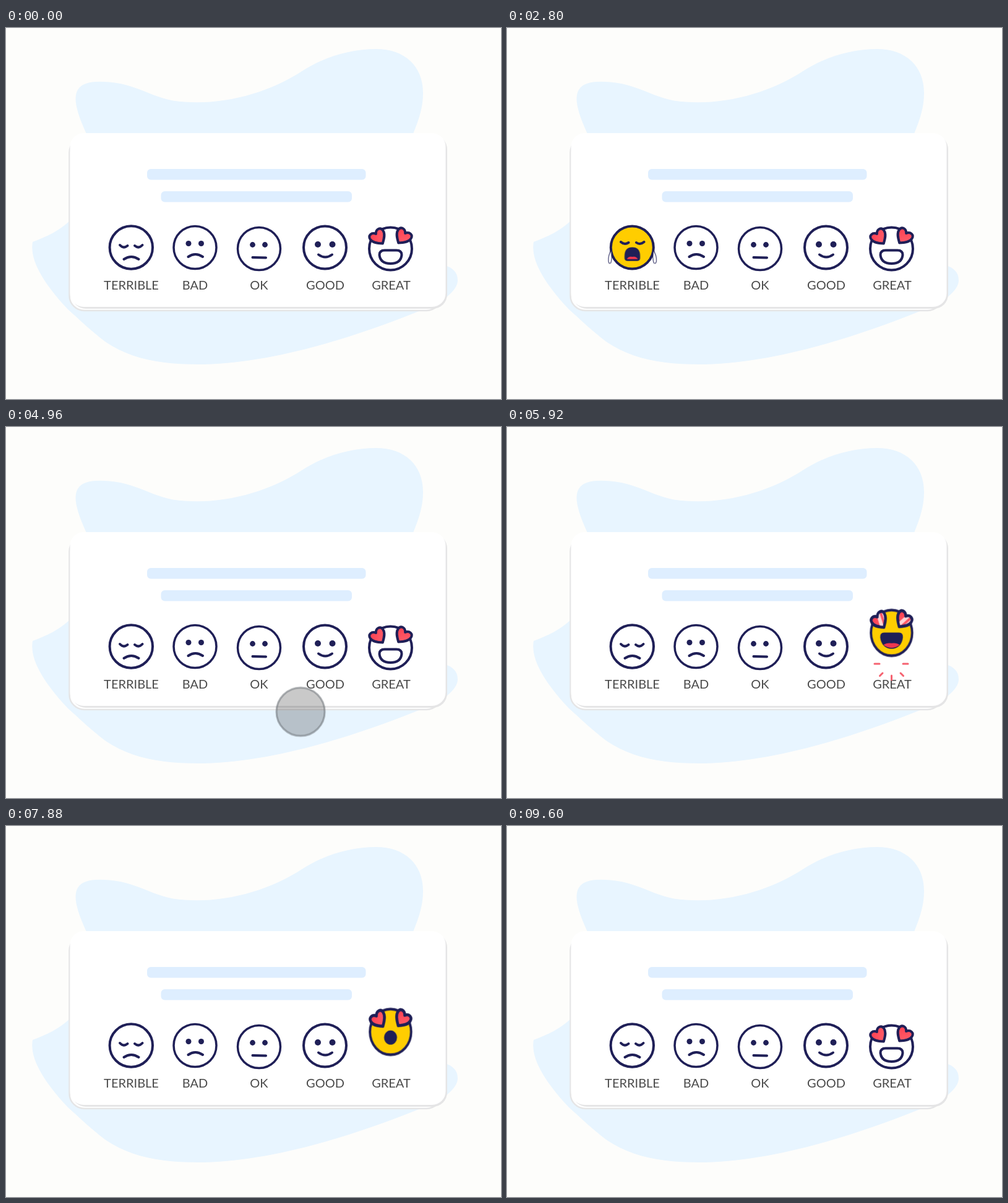
An HTML page that plays this animation: 800x600 px, repeating every 9620 ms.

```html
<!DOCTYPE html>
<html lang="en">
<head>
<meta charset="utf-8">
<title>Feedback card</title>
<style>
html, body { margin: 0; width: 100%; height: 100%; overflow: hidden; background: #fdfdfb; }
svg { display: block; width: 800px; height: 600px; }
text { font: 20px Lato, "Open Sans", sans-serif; fill: #4a4a4a; text-anchor: middle; }

:root { --loop: 9620ms; --half: 4810ms; }
.blob { fill: #e8f5ff; }
.bar { fill: #deeeff; }
.line { fill: none; stroke: #1f1f57; stroke-width: 4; stroke-linecap: round; stroke-linejoin: round; }
.thin { stroke-width: 3.5; }
.ink { fill: #1f1f57; }
.sun { fill: #ffcd00; }
.rose { fill: url(#rose); }
.tongue { fill: #f0374f; }
.drop { fill: #fff; stroke: #1f1f57; stroke-width: 1.4; }

/* Card stack */
.front { animation: swipe var(--half) infinite; }
.next { animation: promote var(--half) infinite; }
@keyframes swipe {
  0%, 80.665% { transform: none; animation-timing-function: cubic-bezier(.45, 0, .55, 1); }
  89.106%, 100% { transform: translateX(-720px); }
}
@keyframes promote {
  0% { opacity: 0; transform: translate(-8px, 3px); animation-timing-function: step-end; }
  81.2% { opacity: 1; transform: translate(-8px, 3px); }
  83.4%, 100% { opacity: 1; transform: none; }
}

.active { animation: show var(--loop) step-end infinite; }
.idle { animation: hide var(--loop) step-end infinite; }
@keyframes show { 0% { opacity: 0; } 4.68% { opacity: 1; } 50%, 100% { opacity: 0; } }
@keyframes hide { 0% { opacity: 1; } 4.68% { opacity: 0; } 50%, 100% { opacity: 1; } }

.sob { transform-origin: 202px 355px; animation: sob var(--loop) ease-in-out infinite; }
@keyframes sob {
  0%, 4.68% { transform: none; }
  5.82% { transform: scale(1.06, .93); }
  7.07% { transform: scale(.95, 1.06); }
  8.32% { transform: scale(1.02, .98); }
  9.4% { transform: none; }
  16.4% { transform: translateY(-1px) scale(.97, 1.04); }
  22.9% { transform: none; }
  24% { transform: scale(1.03, .97); }
  25.5%, 100% { transform: none; }
}
.weep { animation: early var(--loop) infinite; }
.wail { animation: late var(--loop) infinite; }
@keyframes early { 0%, 22.9% { opacity: 1; } 23.6%, 100% { opacity: 0; } }
@keyframes late { 0%, 22.9% { opacity: 0; } 23.6%, 100% { opacity: 1; } }
.tear { animation: tear 962ms linear infinite; transform-box: fill-box; transform-origin: 50% 0; }
@keyframes tear {
  0%, 35% { transform: scale(0); opacity: 1; }
  62% { transform: scale(1); opacity: 1; }
  95% { transform: translateY(22px); opacity: 1; }
  100% { transform: translateY(25px); opacity: 0; }
}
.stream { animation: stream 481ms linear infinite; }
@keyframes stream {
  0% { transform: translateY(-2px); opacity: .7; }
  11% { transform: none; opacity: 1; }
  80% { transform: translateY(10px); opacity: .8; }
  100% { transform: translateY(14px); opacity: 0; }
}
.howl { transform-box: fill-box; transform-origin: 50% 0; animation: howl 481ms ease-in-out infinite; }
@keyframes howl { 0%, 25%, 100% { transform: none; } 60% { transform: scale(.93, .86); } }

.jump { transform-origin: 621.5px 357px; animation: jump var(--loop) ease-in-out infinite; }
@keyframes jump {
  0%, 4.68% { transform: none; }
  5.82% { transform: translateY(3px) scale(1.07, .9); }
  7.9% { transform: translateY(-27px) scale(.95, 1.09); }
  9.36%, 100% { transform: translateY(-24px) scale(.965, 1.07); }
}
.laugh, .gasp { transform-box: fill-box; transform-origin: center; }
.laugh { animation: laugh var(--loop) infinite; }
.gasp { animation: gasp var(--loop) infinite; }
@keyframes laugh {
  0%, 22% { transform: none; opacity: 1; }
  23.9% { transform: scale(.55, .9); opacity: 1; }
  24%, 100% { transform: scale(.5); opacity: 0; }
}
@keyframes gasp { 0%, 23.4% { transform: scale(0); } 24.4%, 100% { transform: none; } }
.shine { fill: #fff; opacity: .75; animation: shine var(--loop) linear infinite; }
@keyframes shine { 0%, 9.9% { transform: translateX(-32px); } 13.2%, 100% { transform: translateX(32px); } }
.burst { fill: none; stroke: #f5616f; stroke-width: 3; stroke-linecap: round; transform-origin: 621.5px 383px; animation: burst var(--loop) ease-out infinite; }
@keyframes burst {
  0%, 8.8% { transform: scale(.4); opacity: 0; }
  9.4% { transform: scale(.6); opacity: 1; }
  11.54% { transform: none; opacity: 1; }
  13%, 100% { transform: scale(1.08); opacity: 0; }
}

/* Pointer */
.pointer { animation: travel var(--loop) infinite; }
.press { animation: press var(--half) infinite; }
.press circle { fill: rgba(0, 0, 0, .21); stroke: rgba(105, 110, 115, .55); stroke-width: 3; }
@keyframes travel {
  0%, .312% { transform: translate(400px, 500px); animation-timing-function: cubic-bezier(.45, 0, .55, 1); }
  3.482%, 8% { transform: translate(161px, 376px); }
  8.01%, 40.333% { transform: translate(472px, 395px); animation-timing-function: cubic-bezier(.45, 0, .55, 1); }
  44.553%, 49.99% { transform: translate(100px, 395px); }
  50%, 50.312% { transform: translate(400px, 500px); animation-timing-function: cubic-bezier(.45, 0, .55, 1); }
  53.482%, 58% { transform: translate(639px, 376px); }
  58.01%, 90.333% { transform: translate(472px, 395px); animation-timing-function: cubic-bezier(.45, 0, .55, 1); }
  94.553%, 100% { transform: translate(100px, 395px); }
}
@keyframes press {
  0%, .4% { opacity: 0; transform: none; }
  .8%, 7% { opacity: 1; transform: none; }
  9% { opacity: 1; transform: scale(.84); }
  11% { opacity: 1; transform: none; }
  14%, 73% { opacity: 0; transform: none; }
  76%, 80% { opacity: 1; transform: none; }
  81.1% { opacity: 1; transform: scale(1.06, .97); }
  86% { opacity: 1; transform: scale(1.1, .94); }
  89%, 100% { opacity: 0; transform: none; }
}

/* The great face reacts in the second half of the loop */
.great .idle, .great .active, .great .active * { animation-delay: calc(-1 * var(--half)); }
</style>
</head>
<body>
<svg viewBox="0 0 800 600">
  <defs>
    <linearGradient id="rose" x1="0" y1="0" x2="1" y2="1">
      <stop offset="0" stop-color="#ff3d50"/><stop offset="1" stop-color="#ff6670"/>
    </linearGradient>
    <path id="heart" d="M0 13.500C-7 8-12.500 3-12.500-3.500C-12.500-11-4-12-0-5.500C4-12 12.500-11 12.500-3.500C12.500 3 7 8 0 13.500Z"/>
    <clipPath id="heartClip"><use href="#heart"/></clipPath>
    <g id="hearts" class="line rose">
      <use href="#heart" transform="translate(601 337.500) rotate(-35)"/>
      <use href="#heart" transform="translate(642 336.500) rotate(35)"/>
    </g>
    <path id="stripes" d="M-6 14L2-14H8L0 14ZM4 14L12-14H14L6 14Z"/>
    <path id="drop" d="M0 0C2.500 4 3.200 6 3.200 7.500A3.200 3.200 0 0 1-3.200 7.500C-3.200 6-2.500 4 0 0Z"/>
    <path id="grin" d="M612 359.500H631Q639.500 359.500 639.500 367Q638 381 621.500 381Q605 381 603.500 367Q603.500 359.500 612 359.500Z"/>

    <g id="base">
      <rect x="106" y="173" width="607" height="281" rx="23" fill="#e5e5e6"/>
      <rect x="103.500" y="170" width="607" height="281" rx="22" fill="#fff"/>
      <rect class="bar" x="228" y="228" width="353.500" height="17.500" rx="6"/>
      <rect class="bar" x="250.500" y="264" width="308.500" height="17.500" rx="6"/>
      <g>
        <text x="202.500" y="422.500">TERRIBLE</text>
        <text x="305.500" y="422.500">BAD</text>
        <text x="409" y="422.500">OK</text>
        <text x="516" y="422.500">GOOD</text>
        <text x="622.500" y="422.500">GREAT</text>
      </g>
      <g class="line">
        <circle class="thin" cx="305.500" cy="355" r="34.500"/>
        <path d="M294.500 370Q306 362 318 370"/>
        <circle class="thin" cx="409" cy="357" r="34.500"/>
        <path d="M398.500 371L420 371.500"/>
        <circle cx="515.500" cy="355" r="34.500"/>
        <path d="M505 366.500Q516 374.500 527 366.500"/>
      </g>
      <g class="ink">
        <circle cx="295" cy="348.500" r="4.500"/><circle cx="315.500" cy="348.500" r="4.500"/>
        <circle cx="398.500" cy="350.500" r="4.400"/><circle cx="418.500" cy="350.500" r="4.400"/>
        <circle cx="504" cy="350" r="5"/><circle cx="527.500" cy="350" r="5"/>
      </g>
    </g>
    <g id="sadIdle" class="line">
      <circle cx="202.300" cy="355" r="34.700"/>
      <path d="M184 351Q190 357.500 196.500 352M208 352Q214.500 357.500 220.500 351M190.500 374Q202.500 366 214.500 374"/>
    </g>
    <g id="greatIdle" class="line">
      <circle cx="621.500" cy="357" r="34.500"/>
      <use href="#grin"/>
      <use href="#hearts"/>
    </g>
  </defs>

  <path class="blob" d="M130 171C112 132 109 112 116 100C124 86 148 84 185 90C215 96 240 112 270 117.500C340 128 420 108 478 70C515 46 558 34 598 34C645 34 674 62 674 105C674 128 668 146 658 171Z"/>
  <path class="blob" d="M104 311C85 329 66 337 43 346C38 375 60 412 100 455C120 473 140 492 160 507C200 535 250 544 310 544C420 544 550 505 665 459C705 445 730 425 730 408C730 395 722 388 710 384V311Z"/>
  <rect x="102.500" y="177" width="601" height="280" rx="24" fill="#fff" stroke="#e5e5e6" stroke-width="2.500"/>

  <g class="next">
    <use href="#base"/><use href="#sadIdle"/><use href="#greatIdle"/>
  </g>

  <g class="front">
    <use href="#base"/>

    <g class="idle"><use href="#sadIdle"/></g>
    <g class="active">
      <g class="sob">
        <circle class="line sun" cx="202.300" cy="355" r="34.500"/>
        <g class="weep">
          <path class="line" d="M184.500 344Q191 349.500 198 345.500M208 345.500Q214 349.500 220 344M191 365.500Q203 362.500 214 364.500"/>
          <use href="#drop" class="drop tear" x="191" y="346"/>
          <use href="#drop" class="drop tear" x="214" y="344"/>
        </g>
        <g class="wail">
          <path class="line" d="M184 346Q190 351.500 196.500 347M209 347Q215 351.500 221.500 346"/>
          <g class="howl">
            <path class="ink" d="M189.500 370C189.500 359 194 354.500 202.500 354.500C211 354.500 215.500 359 215.500 370V373Q215.500 378 210 378H195Q189.500 378 189.500 373Z"/>
            <path class="tongue" d="M193.500 375Q196 369.500 202.500 371Q209 369.500 211.500 375Z"/>
          </g>
          <g class="drop stream">
            <path d="M169 348C165 354 163.500 362 164 367Q165 372 168 369Q170 361 169 348Z"/>
            <path d="M236 348C240 354 242 362 241.500 367Q240 372 237 369Q235 361 236 348Z"/>
          </g>
        </g>
      </g>
    </g>

    <g class="great">
      <g class="idle"><use href="#greatIdle"/></g>
      <g class="active">
        <path class="burst" d="M594 383H602M640 383H648M602.500 402.500L607 398M636 398L640.500 402.500M621.500 402V409"/>
        <g class="jump">
          <circle class="line sun" cx="621.500" cy="357" r="34.500"/>
          <g class="laugh">
            <path class="ink" d="M609 356.500H634Q641 356.500 640.500 364C639 375 632 381 621.500 381C611 381 604 375 602.500 364Q602 356.500 609 356.500Z"/>
            <path class="tongue" d="M608 375Q613 371.500 621.500 372.500Q630 371.500 635 375Q630 379.500 621.500 379.500Q613 379.500 608 375Z"/>
          </g>
          <circle class="ink gasp" cx="621.500" cy="365.500" r="10.800"/>
          <use href="#hearts"/>
          <g transform="translate(601 337.500) rotate(-35)">
            <g clip-path="url(#heartClip)"><use href="#stripes" class="shine"/></g>
            <use href="#heart" class="line"/>
          </g>
          <g transform="translate(642 336.500) rotate(35)">
            <g clip-path="url(#heartClip)"><use href="#stripes" class="shine"/></g>
            <use href="#heart" class="line"/>
          </g>
        </g>
      </g>
    </g>
  </g>

  <g class="pointer"><g class="press"><circle r="39"/></g></g>
</svg>
</body>
</html>
```
